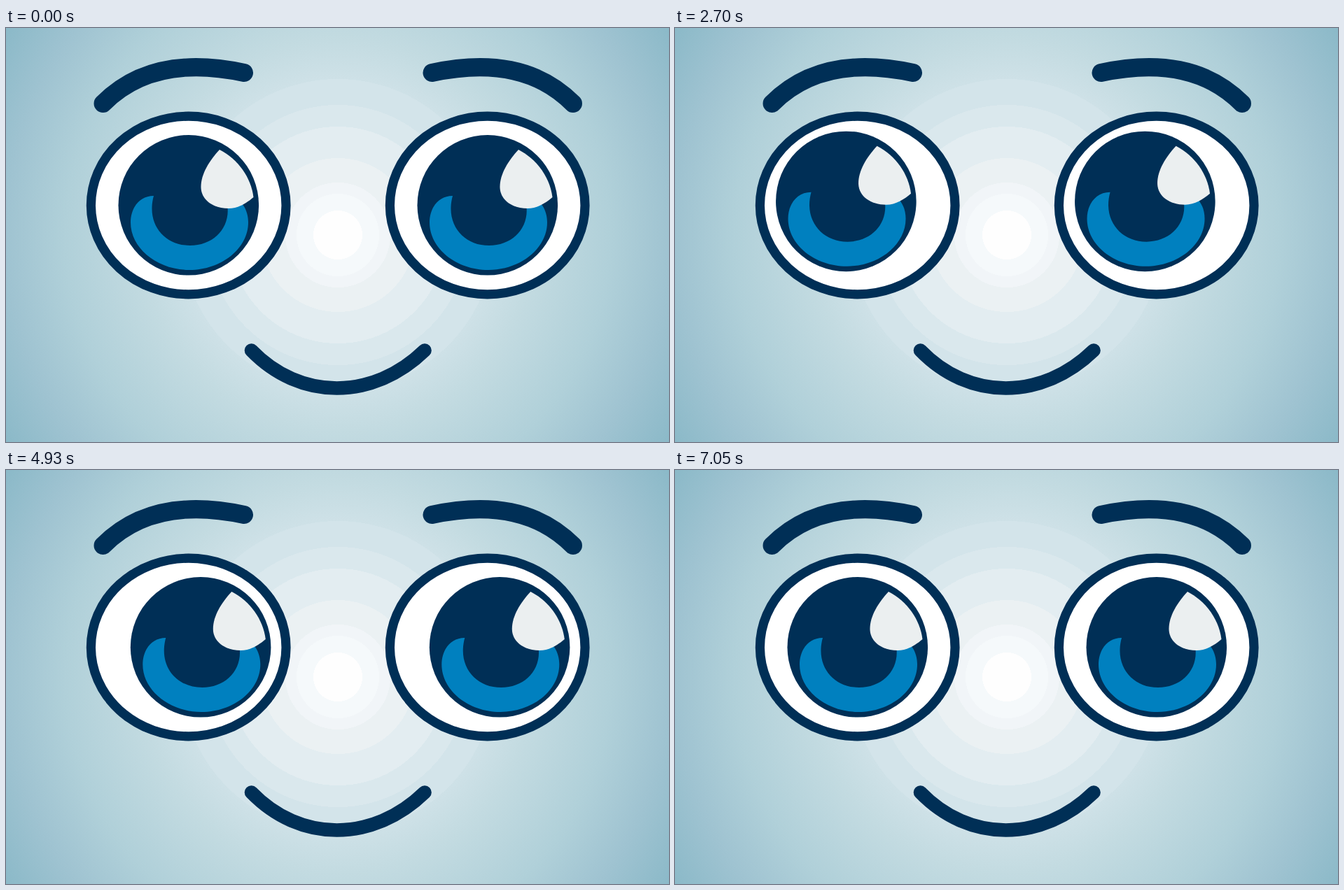
Animation of 947x592 px, one loop 8000 ms. Source, as an HTML page:

```html
<!DOCTYPE html>
<html lang="en">
<head>
<meta charset="utf-8">
<title>Looking around</title>
<style>
  html, body { margin: 0; width: 100%; height: 100%; overflow: hidden; }
  svg { display: block; width: 100vw; height: 100vh; }
</style>
</head>
<body>
<svg viewBox="0 0 947 592" preserveAspectRatio="none">
  <defs>
    <radialGradient id="glow" gradientUnits="userSpaceOnUse" cx="474" cy="296" r="558"></radialGradient>
    <path id="brow" d="M138.5 108C185 61 252 45 340 64" fill="none" stroke="#002f56" stroke-width="26" stroke-linecap="round"/>
    <ellipse id="white" rx="139.3" ry="127.3" fill="#fff" stroke="#002f56" stroke-width="13.2"/>
    <g id="iris" transform="translate(-260.7 -253.5)">
      <circle cx="260.8" cy="253.3" r="100.3" fill="#002f56"/>
      <path fill="#0080bf" d="M211 240C190 240 178 258 178 278C178 315 216 346 262 346C308 346 346 315 346 278C346 258 334 240 313 240C327 280 300 311 263 311C226 311 200 280 211 240Z"/>
      <path fill="#ebeff0" d="M305 174C290 190 278 210 278.5 228C279 246 296 258 318 258C332 258 344 250 353.5 242C350 214 332 188 305 174Z"/>
    </g>
  </defs>
  <rect width="947" height="592" fill="url(#glow)"/>
  <use href="#brow"/>
  <use href="#brow" transform="translate(948.5) scale(-1 1)"/>
  <path d="M350.5 461C420 533 524 533 598 461" fill="none" stroke="#002f56" stroke-width="19.6" stroke-linecap="round"/>
  <g class="eye"><use href="#white"/><use class="gaze" href="#iris"/></g>
  <g class="eye"><use href="#white"/><use class="gaze" href="#iris"/></g>
</svg>
<script>
const LOOP = 8000;
const ORBIT = 17.3;
const EYE_X = [260.7, 687.7];
const EYE_Y = 253.5;

// Inner rings are flat bands [outer radius, colour]; beyond them the colour fades smoothly.
const bands = [
  [35, '#fefefe'], [59, '#f5f9fb'], [75, '#f1f5f8'], [110, '#ebf1f3'],
  [155, '#e3edf1'], [186, '#dae8ed'], [223, '#d3e4ea']
];
const fade = [[223, '#cee1e7'], [279, '#c3dbe1'], [390, '#b0d0d9'], [474, '#9fc3d1'], [558, '#8bb9c8']];

function addStop(radius, color) {
  const stop = document.createElementNS('http://www.w3.org/2000/svg', 'stop');
  stop.setAttribute('offset', radius / 558);
  stop.setAttribute('stop-color', color);
  document.getElementById('glow').append(stop);
}
bands.forEach(([radius, color], i) => {
  addStop(i ? bands[i - 1][0] : 0, color);
  addStop(radius, color);
});
fade.forEach(stop => addStop(...stop));

const polar = degrees => {
  const a = degrees * Math.PI / 180;
  return [ORBIT * Math.cos(a), ORBIT * Math.sin(a)];
};
const sweep = (from, to) => p => polar(from + (to - from) * p);
const line = (a, b) => p => a.map((v, i) => v + (b[i] - v) * p);
const hold = (x, y) => () => [x, y];

// Gaze moves: first step, last step, number of steps, path.
const moves = [
  [0, 0, 1, hold(0, 0)],
  [1680, 1680, 1, hold(-5.5, 2)],
  [1780, 1780, 1, () => polar(160)],
  [2140, 2880, 9, sweep(160, 200)],
  [2980, 3720, 9, sweep(200, 343)],
  [3800, 4550, 9, sweep(343, 420.5)],
  [4830, 4830, 1, () => polar(0)],
  [5390, 5670, 4, sweep(0, 118)],
  [5850, 6030, 3, line(polar(118), [-9.5, 3.5])],
  [6510, 6510, 1, hold(-5.5, 1.5)],
  [6590, 6590, 1, hold(-5.5, 2.8)],
  [6770, 6770, 1, hold(-4.5, 1.2)],
  [6870, 6870, 1, hold(-4.5, 2.8)],
  [7050, 7050, 1, hold(0, 0)]
];

// Eye openness from each time on.
const lids = [[0, 1], [750, 0.5], [840, 0.1], [930, 1], [4650, 0.1], [4830, 0.5], [4930, 1]];

const current = (list, t) => list.findLast(item => item[0] <= t);

function gazeAt(t) {
  const [start, end, steps, path] = current(moves, t);
  if (steps === 1) return path(1);
  const interval = (end - start) / (steps - 1);
  const step = Math.min(steps, 1 + Math.floor((t - start + 4) / interval));
  return path(1 - (1 - step / steps) ** 2);
}

const eyes = document.querySelectorAll('.eye');
const gazes = document.querySelectorAll('.gaze');

function draw(t) {
  const [x, y] = gazeAt(t);
  const open = current(lids, t)[1];
  eyes.forEach((eye, i) => eye.setAttribute('transform', `translate(${EYE_X[i]} ${EYE_Y}) scale(1 ${open})`));
  gazes.forEach(gaze => gaze.setAttribute('transform', `translate(${x} ${y})`));
}

function tick() {
  draw(performance.now() % LOOP);
  requestAnimationFrame(tick);
}
tick();
</script>
</body>
</html>
```
